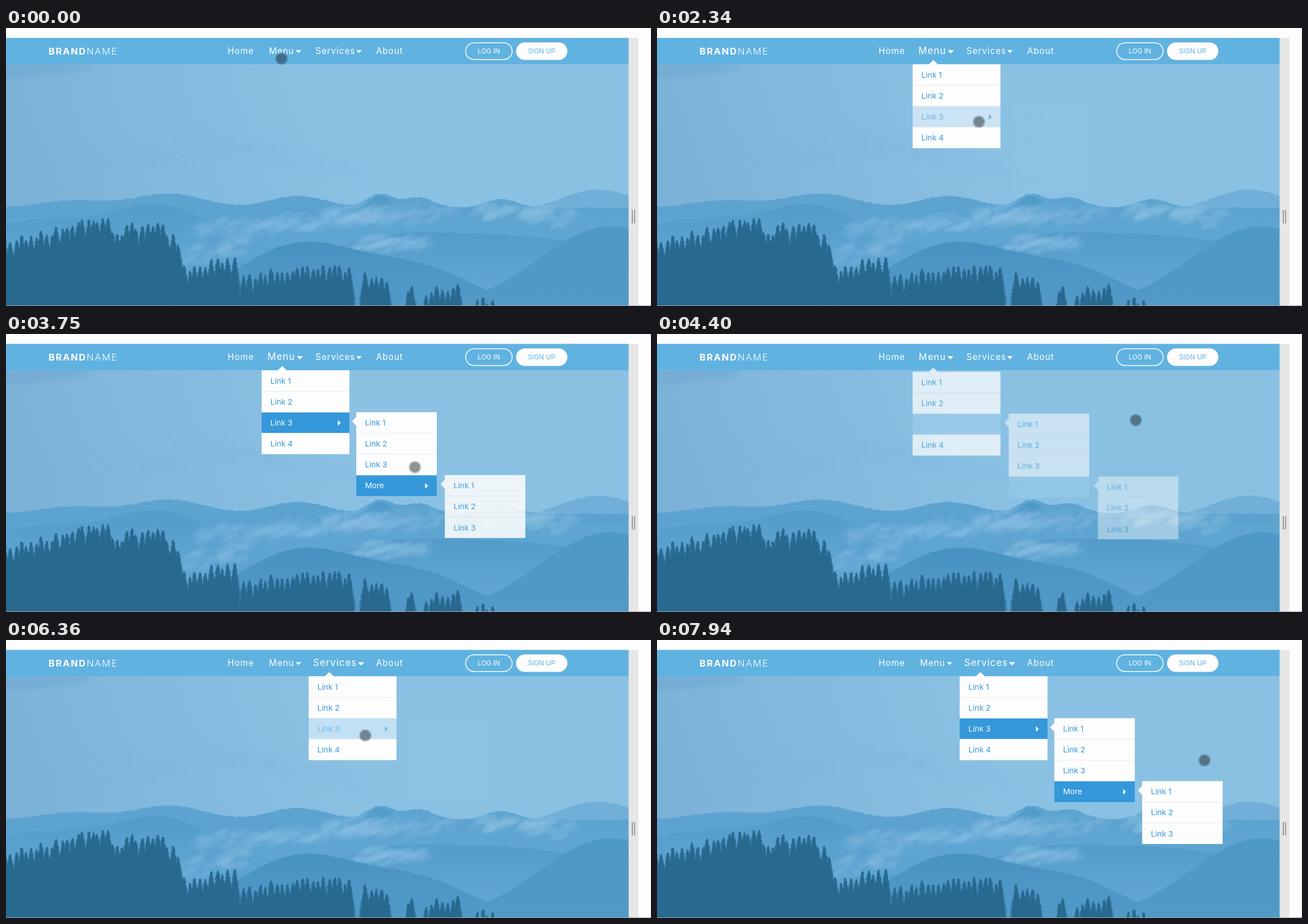
Write an HTML page with a canvas that moves like this. It is 1138 px wide and 492 px high and loops after 8 s.

```html
<!DOCTYPE html>
<html lang="en">
<head>
<meta charset="utf-8">
<title>Dropdown navigation</title>
<style>
  html, body { margin: 0; width: 100%; height: 100%; overflow: hidden; background: #fdfdfd; }
  canvas, svg { position: absolute; left: 0; top: 0; }
  text { font-family: Inter, "Open Sans", sans-serif; fill: #fff; white-space: pre; }
  .nav { font-size: 15.2px; letter-spacing: 1px; }
  .brand { font-size: 16.4px; letter-spacing: 1.8px; }
  .button { font-size: 11.8px; }
  .link { font-size: 13.7px; }
</style>
</head>
<body>
<canvas id="scene" width="1138" height="492"></canvas>
<svg id="ui" width="1138" height="492"></svg>
<script>
const LOOP = 8000, STEP = 130.6, ROW = 37.1, TOP = 64.2, BLUE = [52, 152, 219];
const clamp = x => Math.min(1, Math.max(0, x));

// ---------- landscape ----------
const ctx = document.getElementById('scene').getContext('2d');
let seed = 11;
const rand = () => (seed = (seed * 16807) % 2147483647) / 2147483647;

function box(x, y, w, h, fill) {
  ctx.fillStyle = fill;
  ctx.fillRect(x, y, w, h);
}

function fade(x0, y0, x1, y1, ...colors) {
  const g = ctx.createLinearGradient(x0, y0, x1, y1);
  colors.forEach((c, i) => g.addColorStop(i / (colors.length - 1), c));
  return g;
}

// A hill line: a base height raised by bumps of [centre, height, width].
function ridge(base, fill, ...bumps) {
  ctx.fillStyle = fill;
  ctx.beginPath();
  ctx.moveTo(0, 495);
  for (let x = 0; x <= 1100; x += 2) {
    const rise = bumps.reduce((sum, [c, h, w]) => sum + h * Math.exp(-(((x - c) / w) ** 2)), 0);
    ctx.lineTo(x, base - rise + (rand() - .5) * 2);
  }
  ctx.lineTo(1100, 495);
  ctx.fill();
}

// Ragged puffs scattered along a line.
function mist(x0, y0, x1, y1, spread, alpha) {
  ctx.filter = 'blur(2px)';
  ctx.fillStyle = `rgba(140,194,228,${alpha})`;
  for (let i = 0; i < (x1 - x0) * .45; i++) {
    const k = rand(), r = 3 + rand() * 9, drift = (rand() + rand() - 1) * spread;
    ctx.beginPath();
    ctx.ellipse(x0 + (x1 - x0) * k, y0 + (y1 - y0) * k + drift, r * 1.6, r * .6, -.35, 0, 7);
    ctx.fill();
  }
  ctx.filter = 'none';
}

function conifer(x, top) {
  ctx.beginPath();
  for (const dir of [1, -1]) {
    ctx.moveTo(x, top);
    for (let d = 4; top + d < 496; d += 4) {
      const w = Math.min(11, 1 + d * .2) + rand() * 2;
      ctx.lineTo(x + dir * w, top + d);
      ctx.lineTo(x + dir * w * .6, top + d + 1);
    }
    ctx.lineTo(x, 496);
  }
  ctx.fill();
}

// A stand of trees whose tops run from y0 to y1.
function forest(x0, y0, x1, y1) {
  const n = Math.max(1, Math.round((x1 - x0) / 9));
  for (let i = 0; i <= n; i++) {
    const k = i / n;
    conifer(x0 + (x1 - x0) * k + (rand() - .5) * 4, y0 + (y1 - y0) * k + (rand() - .4) * 14);
  }
}

function drawScene() {
  ctx.save();
  ctx.beginPath();
  ctx.rect(0, 18, 1099, 473);
  ctx.clip();
  box(0, 64, 1099, 427, fade(0, 300, 560, 100, '#7bb1d6', '#83b9dc', '#8ac1e3'));
  ctx.filter = 'blur(3px)';
  ctx.fillStyle = 'rgba(100,162,206,.35)';
  ctx.beginPath();
  ctx.ellipse(0, 78, 150, 12, -.06, 0, 7);
  ctx.fill();
  mist(90, 215, 330, 240, 40, .08);
  mist(280, 185, 640, 260, 30, .08);

  ridge(330, '#71afd8', [1045, 44, 100]);
  ridge(318, fade(0, 295, 0, 380, '#5da4d1', '#5ba2cf', '#64a9d5'), [120, 13, 80], [287, 25, 85],
    [515, 21, 70], [660, 24, 32], [728, 18, 38], [874, 15, 40]);
  ridge(335, fade(0, 296, 0, 335, '#4e98c7', '#5ea5d1'), [660, 38, 34]);
  ridge(400, fade(0, 312, 0, 400, '#539bca', '#5da4d1'), [40, 55, 130], [270, 85, 140]);
  mist(335, 360, 450, 350, 26, .16);
  mist(455, 350, 660, 325, 20, .24);
  mist(600, 335, 790, 325, 18, .16);
  mist(830, 322, 1000, 335, 18, .22);

  ridge(440, fade(0, 360, 0, 460, '#539bc9', '#5aa1ce', '#62a7d3'), [820, 76, 380], [690, 8, 80]);
  mist(600, 388, 740, 380, 16, .24);
  mist(315, 405, 430, 380, 24, .16);
  ridge(495, fade(0, 374, 0, 491, '#4791c1', '#4d96c6', '#5099c8'), [520, 113, 160], [740, 60, 130]);
  ridge(495, fade(0, 350, 0, 491, '#4e98c7', '#5199c7'), [1065, 144, 175]);

  ctx.fillStyle = '#28698f';
  forest(0, 378, 90, 356);
  forest(100, 346, 180, 338);
  forest(188, 358, 205, 366);
  forest(212, 350, 268, 340);
  forest(276, 348, 302, 376);
  forest(316, 424, 352, 416);
  forest(364, 410, 402, 404);
  forest(420, 440, 505, 422);
  forest(514, 418, 606, 424);
  forest(634, 436, 674, 446);
  forest(711, 460, 714, 456);
  forest(742, 464, 796, 456);
  forest(830, 482, 860, 480);
  ctx.restore();

  box(0, 0, 1138, 17.5, '#fdfdfd');
  box(0, 17.5, 1099, 46.5, '#60b2e0');
  box(1116, 17, 22, 475, '#fdfdfd');
  box(1098.5, 17.5, 17.5, 474, '#e6e6e6');
  box(1104, 322, 2, 24, '#9b9b9b');
  box(1108, 322, 2, 24, '#9b9b9b');
  box(1137, 0, 1, 492, '#dedede');
  box(0, 491, 1138, 1, '#a3a8ab');
}

// ---------- interface ----------
const ui = document.getElementById('ui');
function add(parent, tag, attrs, text) {
  const e = document.createElementNS('http://www.w3.org/2000/svg', tag);
  for (const k in attrs) e.setAttribute(k, attrs[k]);
  if (text) e.textContent = text;
  return parent.appendChild(e);
}
const label = (parent, cls, x, y, text, extra) => add(parent, 'text', { class: cls, x, y, ...extra }, text);

function navItem(x, text, caretX) {
  const g = add(ui, 'g');
  label(g, 'nav', x, 46, text);
  if (caretX) add(g, 'path', {
    d: `M${caretX - 4} 39.8h8l-4 4.2z`, fill: '#fff', stroke: '#fff', 'stroke-linejoin': 'round'
  });
  return g;
}

// A dropdown panel; the row at index `parentRow` opens a further panel.
function panel(parent, x, y, w, names, parentRow, pointsUp) {
  const g = add(parent, 'g'), lit = {};
  add(g, 'path', {
    d: pointsUp ? `M${x + 28} ${y + .5}l8.5 -8 8.5 8z` : `M${x + .5} ${y + 7.5}l-8 8.5 8 8.5z`, fill: '#fdfdfd'
  });
  names.forEach((name, i) => {
    const top = y + i * ROW;
    const bg = add(g, 'rect', { x, y: top, width: w, height: ROW, fill: '#fdfdfd' });
    if (i) add(g, 'rect', { x, y: top - .5, width: w, height: 1, fill: '#e6ebef' });
    const text = label(g, 'link', x + 15.5, top + 23.6, name, { style: 'fill:#3498db' });
    if (i === parentRow) {
      const caret = add(g, 'path', { d: `M${x + w - 20} ${top + 15}l4 4 -4 4z`, 'stroke-linejoin': 'round' });
      Object.assign(lit, { bg, text, caret });
    }
  });
  return { g, lit };
}

const links = ['Link 1', 'Link 2', 'Link 3', 'Link 4'];
function menu(x, item, cx, open, close) {
  const first = panel(ui, x, TOP, 155, links, 2, true);
  const second = panel(first.g, x + 167, TOP + 2 * ROW, 142, [...links.slice(0, 3), 'More'], 3);
  const third = panel(second.g, x + 322, TOP + 5 * ROW, 142, links.slice(0, 3));
  return { panels: [first, second, third], item, cx, open, close };
}

drawScene();
const brand = label(ui, 'brand', 75, 46.5);
add(brand, 'tspan', { 'font-weight': 700 }, 'BRAND');
add(brand, 'tspan', { 'font-weight': 300 }, 'NAME');
navItem(391, 'Home');
const menuItem = navItem(464, 'Menu', 516);
const servicesItem = navItem(546, 'Services', 622.8);
navItem(653, 'About');
const pill = { y: 26.3, height: 29.4, rx: 14.7, stroke: '#fdfdfd', 'stroke-width': 1.5 };
add(ui, 'rect', { ...pill, x: 811, width: 82, fill: 'none' });
add(ui, 'rect', { ...pill, x: 900.7, width: 89, fill: '#fdfdfd' });
label(ui, 'button', 852, 45, 'LOG IN', { 'text-anchor': 'middle' });
label(ui, 'button', 945, 45, 'SIGN UP', { 'text-anchor': 'middle', style: 'fill:#60b2e0' });

const menus = [
  menu(451, menuItem, 492.5, [1210, 2300, 3470], 4324),
  menu(534, servicesItem, 587, [5400, 6343, 7390], Infinity)
];
const pointer = add(ui, 'g');
add(pointer, 'circle', { r: 9, fill: 'rgba(30,40,45,.5)' });
add(pointer, 'circle', { r: 10, fill: 'none', stroke: 'rgba(30,40,45,.27)', 'stroke-width': 2 });

// ---------- motion ----------
// Pointer moves: [start, end, x, y]
const moves = [[0, 0, 486, 54], [490, 750, 491, 46], [1550, 1930, 568, 166], [2330, 3220, 695, 275],
  [3490, 3890, 734, 217], [3890, 4150, 870, 166], [4150, 4410, 846, 153], [4410, 5320, 600, 47],
  [5580, 6110, 634, 169], [6500, 6890, 784, 251], [6890, 7280, 777, 273], [7410, 7810, 966, 213]];

function pointerAt(t) {
  let x = 0, y = 0;
  for (const [t0, t1, toX, toY] of moves) {
    const k = clamp((t - t0) / (t1 - t0 || 1) + (t1 === t0));
    x += (toX - x) * k;
    y += (toY - y) * k;
  }
  return [x, y];
}

// The CSS "ease" curve
function ease(x) {
  if (x <= 0) return 0;
  if (x >= 1) return 1;
  let lo = 0, hi = 1, s;
  for (let i = 0; i < 20; i++) {
    s = (lo + hi) / 2;
    if (.75 * s * (1 - s) + s ** 3 < x) lo = s; else hi = s;
  }
  return .3 * (1 - s) ** 2 * s + 3 * (1 - s) * s * s + s ** 3;
}
const shown = (t, from, to, ms) => ease((t - from) / ms) * (1 - ease((t - to) / ms));
const tint = p => `rgb(${BLUE.map(c => Math.round(254 - (254 - c) * p))})`;

function draw(t) {
  for (const m of menus) {
    m.panels.forEach(({ g, lit }, i) => {
      const p = shown(t, m.open[i], m.close, 500), d = 10 * (1 - p);
      g.setAttribute('opacity', p);
      g.setAttribute('transform', i ? `translate(${d} 0)` : `translate(0 ${d})`);
      if (!lit.bg) return;
      // The parent row lights up just before its panel appears.
      const on = shown(t, m.open[i + 1] - 30, m.close, 300);
      lit.bg.setAttribute('fill', tint(on));
      lit.text.style.fill = tint(1 - on);
      lit.caret.setAttribute('fill', tint(1 - on));
      lit.caret.setAttribute('stroke', tint(1 - on));
    });
    const scale = 1 + .1 * shown(t, m.open[0], m.close, 500);
    m.item.setAttribute('transform', `translate(${m.cx} 41) scale(${scale}) translate(${-m.cx} -41)`);
  }
  pointer.setAttribute('transform', `translate(${pointerAt(t)})`);
}

// The picture advances in even steps, counted from 1280 ms.
const snap = t => Math.max(0, 1280 + STEP * Math.floor((t - 1225) / STEP));

const start = performance.now();
function tick() {
  draw(snap((performance.now() - start) % LOOP));
  requestAnimationFrame(tick);
}
tick();
</script>
</body>
</html>
```
